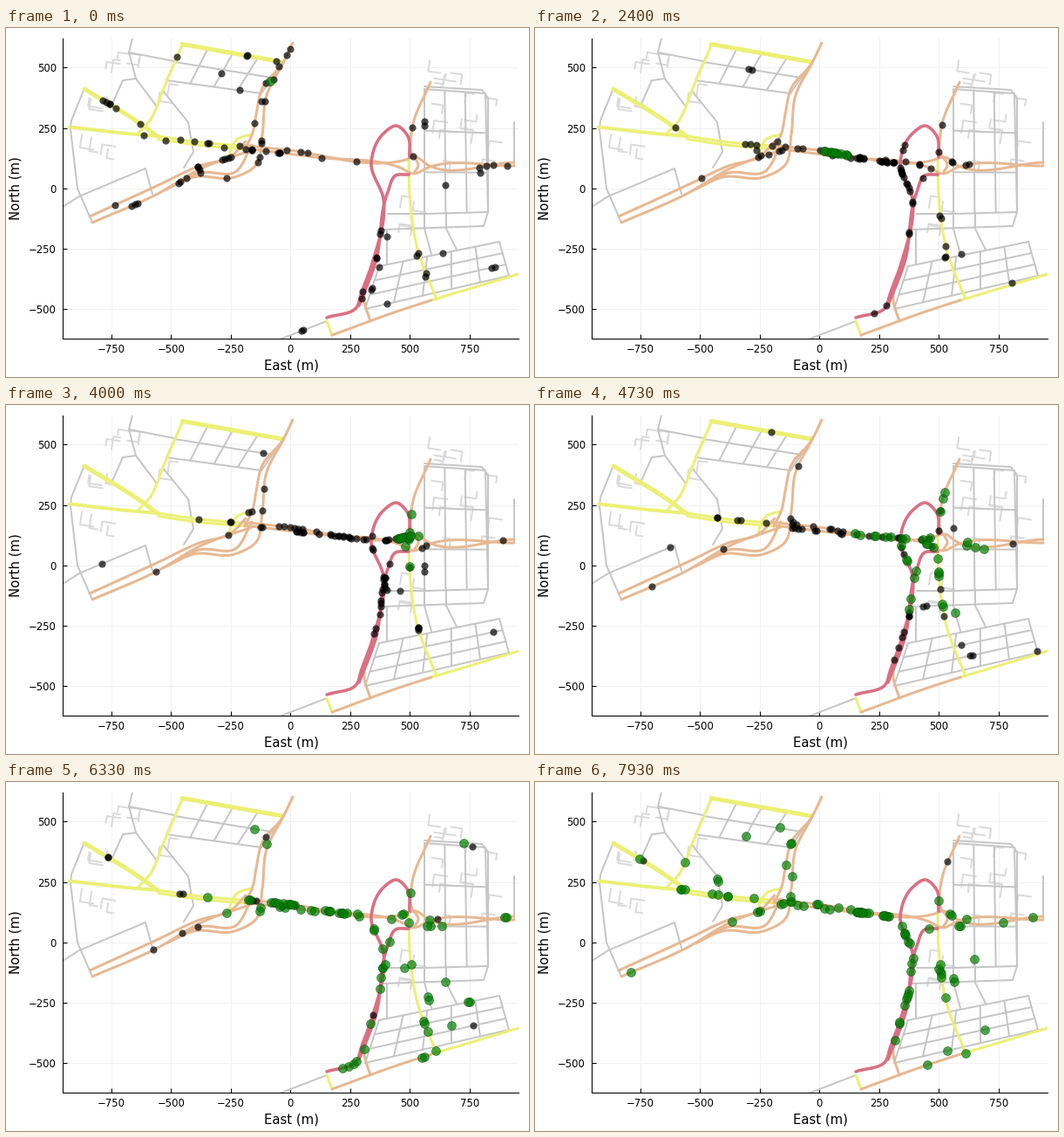
Recreate the animation shown at these times as a matplotlib script. Size 600 by 400 pixels, loop 8 s.

```python
import numpy as np
import matplotlib.pyplot as plt
from matplotlib.animation import FuncAnimation

FRAMES, LOOP = 120, 8000
PX = 0.72              # points per pixel at 100 dpi
RED, ORANGE, YELLOW = "#d97083", "#e7b892", "#ebf074"
GREY, PALE = "#c6c6c6", "#dadada"
rng = np.random.default_rng(4)

plt.rcParams["font.family"] = "DejaVu Sans"
fig = plt.figure(figsize=(6, 4), dpi=100, facecolor="white")
ax = fig.add_axes([65 / 600, 44 / 400, 523 / 600, 344 / 400])
ax.set(xlim=(65, 588), ylim=(356, 12))
ax.set_axisbelow(True)
ax.grid(color="#f0f0f0", lw=0.7)
ax.spines[["top", "right"]].set_visible(False)
ax.spines[["left", "bottom"]].set_linewidth(0.75)


def labels(values):
    return [str(v).replace("-", "\u2212") for v in values]


east, north = range(-750, 751, 250), range(-500, 501, 250)
ax.set_xticks([326.4 + v * 0.274 for v in east], labels(east))
ax.set_yticks([183.7 - v * 0.2766 for v in north], labels(north))
ax.tick_params(direction="in", length=3.5, width=0.75, labelsize=8.4)
ax.tick_params(axis="x", pad=4.4)
ax.tick_params(axis="y", pad=5)
fig.text(327 / 600, 1 - 386.5 / 400, "East (m)", size=10.7, ha="center", va="center")
fig.text(11 / 600, 1 - 184 / 400, "North (m)", size=10.7, ha="center", va="center",
         rotation=90)

# ---- roads -------------------------------------------------------------
nodes, weights = [], []


def length_along(p):
    return np.r_[0, np.cumsum(np.hypot(*np.diff(p, axis=0).T))]


def smooth(points):
    """Hermite curve through a few key points."""
    p = np.array(points, float)
    s = length_along(p)
    slope = np.gradient(p, s, axis=0)
    t = np.linspace(0, s[-1], int(s[-1] / 3) + 2)
    k = np.clip(np.searchsorted(s, t, side="right") - 1, 0, len(s) - 2)
    h = (s[k + 1] - s[k])[:, None]
    u = (t - s[k])[:, None] / h
    return ((2 * u**3 - 3 * u**2 + 1) * p[k] + (u**3 - 2 * u**2 + u) * h * slope[k]
            + (3 * u**2 - 2 * u**3) * p[k + 1] + (u**3 - u**2) * h * slope[k + 1])


def road(color, width, points, traffic=1):
    p = np.array(points, float)
    ax.plot(*p.T, color=color, lw=width * PX, zorder=2,
            solid_capstyle="round", solid_joinstyle="round")
    if traffic:
        s = length_along(p)
        t = np.linspace(0, s[-1], max(2, int(s[-1] / 8) + 1))
        nodes.extend(zip(np.interp(t, s, p[:, 0]), np.interp(t, s, p[:, 1])))
        weights.extend([traffic] * len(t))


def trunk(color, width, *points):
    road(color, width, smooth(points), traffic=4)


def street(*points):
    road(GREY, 2, points)


def blocks(a, b, c, d, rows, cols):
    """Streets dividing the four-sided area a, b, c, d."""
    a, b, c, d = np.array([a, b, c, d], float)
    for v in np.linspace(0, 1, rows):
        street(a + (d - a) * v, b + (c - b) * v)
    for u in np.linspace(0, 1, cols):
        street(a + (b - a) * u, d + (c - d) * u)


def lanes(x, y, w, h, count):
    """Short hooked service lanes scattered over a block."""
    for _ in range(count):
        p = np.array([x, y]) + rng.uniform(-1, 1, 2) * (w, h)
        run, turn = rng.uniform(6, 16, 2) * rng.choice([-1, 1], 2)
        tilt = run * 0.15
        road(PALE, 2, [p, p + (run, tilt), p + (run - turn * 0.15, tilt + turn)],
             traffic=0)


lanes(134, 30, 12, 12, 5)
lanes(110, 92, 20, 12, 3)
lanes(115, 145, 22, 10, 4)
lanes(190, 75, 12, 12, 2)
lanes(510, 60, 22, 10, 5)
lanes(525, 115, 45, 40, 11)
lanes(470, 205, 20, 25, 4)

street((90, 69), (75, 106), (74, 116), (82, 184), (99, 223))
street((65, 205), (84, 193), (160, 161), (168, 190))
street((145, 12), (141, 28), (149, 58), (173, 90), (166, 106))
street((149, 58), (134, 60), (122, 87))
street((141, 28), (193, 38))
street((180, 72), (209, 108), (215, 142), (204, 160))
street((316, 356), (368, 336))
blocks((203, 18), (318, 39), (293, 75), (184, 60), 3, 5)
blocks((480, 70), (550, 75), (553, 211), (480, 213), 4, 4)
blocks((428, 273), (566, 245), (577, 284), (412, 322), 4, 6)
street((480, 67), (546, 71), (553, 80), (553, 211), (548, 227), (432, 231))
street((438, 213), (480, 213), (480, 230), (488, 259))
street((505, 211), (505, 230), (517, 254))
street((583, 108), (583, 156))
street((437, 231), (437, 271))

trunk(YELLOW, 5, (202, 18.5), (317, 39))
trunk(YELLOW, 5, (90, 70), (153, 109), (175, 125))
trunk(YELLOW, 4, (73, 113.5), (150, 122), (175, 124))
trunk(YELLOW, 3, (203, 18), (181, 69), (165, 106), (150, 122))
for dy in (0, 3.5):
    trunk(YELLOW, 3, (175, 124 + dy), (215, 130 + dy), (275, 135.5 + dy))
trunk(YELLOW, 3, (256, 150), (258, 139), (266, 127), (282, 122))
trunk(YELLOW, 3, (462, 152), (463, 190), (472, 253), (494, 311))
trunk(YELLOW, 3, (488, 312), (588, 282))
trunk(YELLOW, 3, (368, 336), (374, 352))

trunk(ORANGE, 3, (329, 17), (317, 41), (294, 69), (287, 99), (283, 120), (274, 139))
trunk(ORANGE, 3, (318, 40), (299, 77), (294, 122), (287, 157), (262, 171),
      (215, 171), (184, 185))
trunk(ORANGE, 3, (96, 216), (175, 180), (222, 158), (258, 147), (275, 130))
trunk(ORANGE, 3, (99, 223), (174, 190), (224, 161), (282, 140))
trunk(ORANGE, 3, (192, 180), (222, 166), (263, 165), (282, 134))
trunk(ORANGE, 3, (274, 134.5), (320, 139.5), (455, 152), (470, 148), (484, 157),
      (583, 154))
trunk(ORANGE, 3, (274, 138), (355, 148), (452, 160), (468, 167), (484, 160),
      (583, 158))
trunk(ORANGE, 3, (487, 62), (466, 115), (465, 143), (473, 158), (468, 166))
trunk(ORANGE, 3, (374, 352), (451, 324), (488, 312))
trunk(ORANGE, 3, (426, 262), (411, 312), (418, 336))

trunk(RED, 3.6, (368, 332), (403, 319), (407, 306), (420, 270), (433, 196),
      (419, 155), (432, 122), (448, 112), (461, 124), (463, 148))
trunk(RED, 3.6, (405, 318), (424, 268), (438, 188), (447, 169), (462, 168))

# ---- shortest ways over the network ------------------------------------
nodes = np.array(nodes)
weights = np.array(weights) / sum(weights)
gap = np.linalg.norm(nodes[:, None] - nodes[None], axis=2)
hop = np.where(gap < 9, gap, 8 * gap) + 0.1
np.fill_diagonal(hop, np.inf)
dist = hop.copy()
np.fill_diagonal(dist, 0)
for k in range(len(nodes)):
    np.minimum(dist, dist[:, k, None] + dist[k], out=dist)


def nearest(x, y):
    return int(np.argmin(np.hypot(*(nodes - (x, y)).T)))


def route(stops):
    way = [stops[0]]
    for goal in stops[1:]:
        while way[-1] != goal:
            way.append(int(np.argmin(hop[way[-1]] + dist[:, goal])))
    return nodes[way]


def pick(where=True):
    chance = weights * where
    return int(rng.choice(len(nodes), p=chance / chance.sum()))


# ---- traffic -----------------------------------------------------------
time = np.arange(FRAMES)
tracks, lit_from = [], []


def drive(path, travelled, lit=FRAMES):
    s = length_along(path)
    tracks.append([np.interp(travelled, s, path[:, i]) for i in (0, 1)])
    lit_from.append(lit)


# everyday trips, every third car with a close follower
for n in range(58):
    stops = [pick()]
    reach = 0
    while reach < 700:
        stops.append(pick())
        reach += dist[stops[-2], stops[-1]]
    path, speed = route(stops), rng.uniform(3.2, 5.2)
    drive(path, 8 + speed * time)
    if n % 3 == 0:
        drive(path, 8 + speed * time - rng.uniform(0, 7))

# the convoy that gathers at the corner and carries the signal to the hub
corner, hub = nearest(282, 122), nearest(464, 152)
near_corner = np.abs(dist[corner] - 90) < 30
for n, joined in enumerate(np.linspace(13, 42, 14)):
    start = pick(near_corner) if n else nearest(303, 63)
    legs = [start, corner, hub, pick(nodes[:, 0] > 410), pick()]
    lag = rng.uniform(-3, 3) if n else 0
    marks = np.cumsum([0] + [length_along(route(leg))[-1]
                             for leg in zip(legs[:2], legs[1:3])])
    moments = [0, 20 + lag, 60 + lag, FRAMES]
    drive(route(legs), np.interp(time, moments, [*marks, marks[-1] + 290]),
          joined if n else 0)

tracks = np.array(tracks).transpose(2, 0, 1)      # frame, car, xy

# beyond the hub the signal spreads in a widening circle
reach = np.where(time < 60, 0, 40 + 6 * (time - 60))[:, None]
inside = np.linalg.norm(tracks - nodes[hub], axis=2) < reach
caught = inside & (rng.random(inside.shape) < 0.08)
caught |= time[:, None] >= np.array(lit_from)
lit = np.logical_or.accumulate(caught, axis=0)

# ---- drawing -----------------------------------------------------------
plain_dots = ax.scatter([], [], s=(8.2 * PX) ** 2, color=(0, 0, 0, 0.7), lw=0, zorder=5)
green_dots = ax.scatter([], [], s=(10 * PX) ** 2, facecolor=(0, 0.5, 0, 0.7),
                        edgecolor=(0, 0.25, 0, 0.6), lw=0.5, zorder=6)


def draw(frame):
    plain_dots.set_offsets(tracks[frame][~lit[frame]])
    green_dots.set_offsets(tracks[frame][lit[frame]])
    return plain_dots, green_dots


anim = FuncAnimation(fig, draw, frames=FRAMES, interval=LOOP / FRAMES,
                     repeat=True, repeat_delay=0, blit=False)
plt.show()
```
